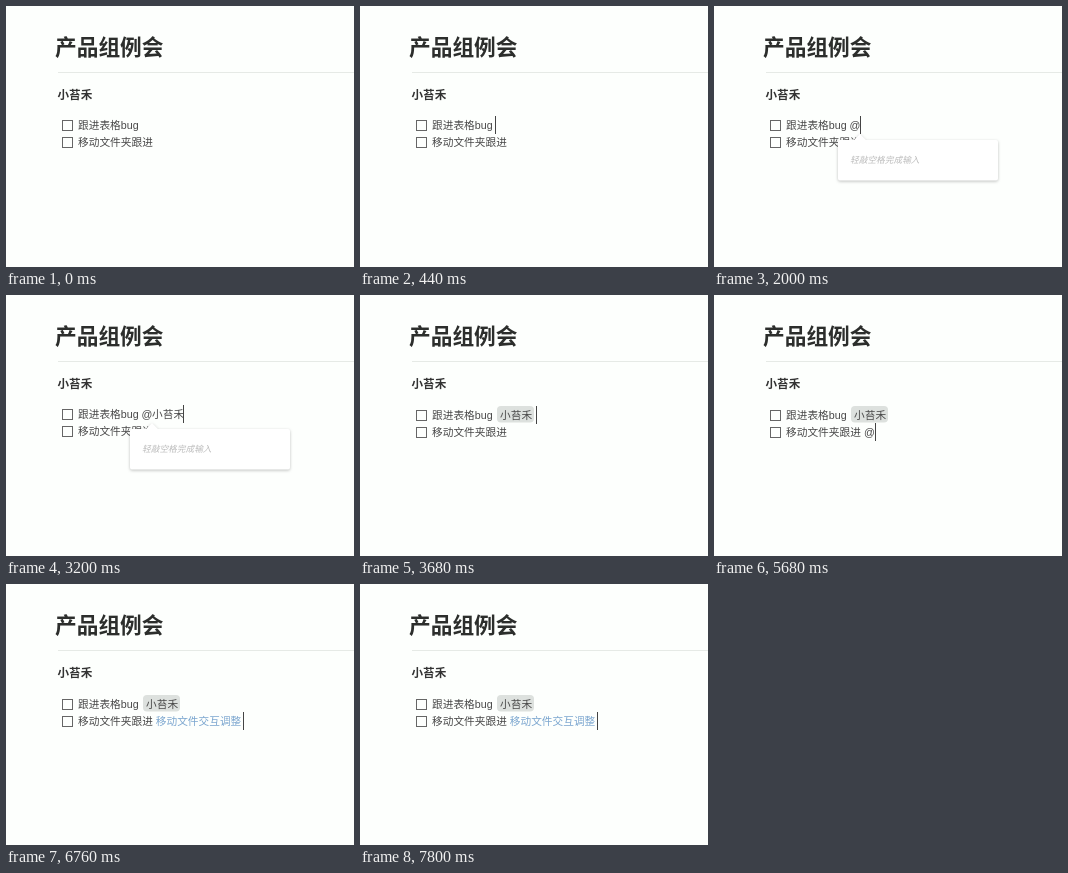
Write an HTML page that moves like this. It is 348x261 px and loops after 7.92 s.

```html
<!DOCTYPE html>
<html lang="zh-CN">
<head>
<meta charset="utf-8">
<style>
  html, body { margin: 0; width: 100%; height: 100%; overflow: hidden; background: #fdfffd; }
  svg { display: block; width: 100%; height: 100%; }
  text { font: 10.7px "Liberation Sans", "Noto Sans CJK SC", "Noto Sans CJK", sans-serif; fill: #484848; white-space: pre; }
  .title { font-size: 21.7px; font-weight: 700; fill: #2c2e2c; }
  .sub { font-size: 11.6px; font-weight: 700; fill: #333; }
  .hint { font-size: 8.7px; font-style: italic; fill: #bbb; }
  .item { font-size: 9px; fill: #555; }
  .link { fill: #7ba6cf; }
  .box { fill: none; stroke: #666; }
  .panel { fill: #fff; filter: drop-shadow(0 1px 1.5px rgba(0, 0, 0, .25)); }
</style>
</head>
<body>
<svg viewBox="0 0 348 261" preserveAspectRatio="none">
  <rect width="348" height="261" fill="#fdfffd"/>
  <text class="title" x="49" y="49">产品组例会</text>
  <path d="M52 66.5H348" stroke="#e6eae6"/>
  <text class="sub" x="51.5" y="93.3">小苔禾</text>

  <g id="tasks">
    <rect class="box" x="56.5" y="114.5" width="10" height="10"/>
    <rect class="box" x="56.5" y="131.5" width="10" height="10"/>
    <rect id="chip" x="137" y="110" width="37" height="16.5" rx="4" fill="#dde1de"/>
    <text x="72" y="122.5">跟进表格bug</text>
    <text id="at1" x="135.5" y="122.5">@</text>
    <text id="name" y="122.5">小苔禾</text>
    <text x="72" y="140">移动文件夹跟进</text>
    <text id="at2" x="150" y="140">@</text>
    <text id="link" class="link" x="149.8" y="140">移动文件交互调整</text>
  </g>

  <g id="people">
    <path id="peopleBg" class="panel"/>
    <text id="hint" class="hint" x="12" y="23.3">轻敲空格完成输入</text>
    <g id="person">
      <rect y="8" width="160" height="25" fill="#f1f4f1"/>
      <text class="item" x="12" y="23.8">小苔禾</text>
    </g>
  </g>
  <g id="files">
    <path id="filesBg" class="panel"/>
    <rect y="8" width="160" height="25" fill="#f1f4f1"/>
    <text class="item" x="12" y="23.8">移动文件交互调整</text>
  </g>
  <rect id="caret" width="1" height="18" fill="#444"/>
</svg>
<script>
const LOOP = 7920;
const $ = id => document.getElementById(id);
const set = (id, attrs) => {
  for (const key in attrs) $(id).setAttribute(key, attrs[key]);
};
const show = (id, on) => set(id, { opacity: Number(on) });
const ramp = (t, a, b) => {
  const k = Math.min(1, Math.max(0, (t - a) / (b - a)));
  return k * k * (3 - 2 * k);
};
const panelPath = h =>
  `M2 0H16L22 -6L28 0H158Q160 0 160 2V${h - 2}Q160 ${h} 158 ${h}H2Q0 ${h} 0 ${h - 2}V2Q0 0 2 0Z`;

// [start, end, x, y] while the caret is visible
const carets = [
  [320, 840, 135, 110],
  [1280, 1320, 135, 110],
  [1320, 2760, 146, 110],
  [2760, 3680, 177, 110],
  [3680, 4320, 176, 111],
  [4320, 4960, 147, 128],
  [5160, 6760, 161, 128],
  [6760, 7320, 237, 128],
  [7800, LOOP, 237, 128]
];

function draw(t) {
  const chipped = t >= 3680;
  set("tasks", { transform: `translate(0 ${chipped ? 1 : 0})` });
  show("chip", chipped);
  show("at1", t >= 1320 && !chipped);
  show("name", t >= 2760);
  set("name", { x: chipped ? 140 : 146 });
  show("at2", t >= 5180 && t < 6760);
  show("link", t >= 6760);

  const listed = ramp(t, 3240, 3440);
  set("people", { transform: "translate(124 134)", opacity: chipped ? 0 : ramp(t, 1800, 2000) });
  set("peopleBg", { d: panelPath(40.5 + 100 * listed) });
  show("hint", 1 - listed);
  show("person", listed);

  set("files", { transform: "translate(138.5 152)", opacity: t < 6760 ? ramp(t, 5740, 6000) : 0 });
  set("filesBg", { d: panelPath(130) });

  const caret = carets.find(([a, b]) => t >= a && t < b);
  show("caret", !!caret);
  if (caret) set("caret", { x: caret[2], y: caret[3] });
}

const start = performance.now();
function tick() {
  draw((performance.now() - start) % LOOP);
  requestAnimationFrame(tick);
}
tick();
</script>
</body>
</html>
```
